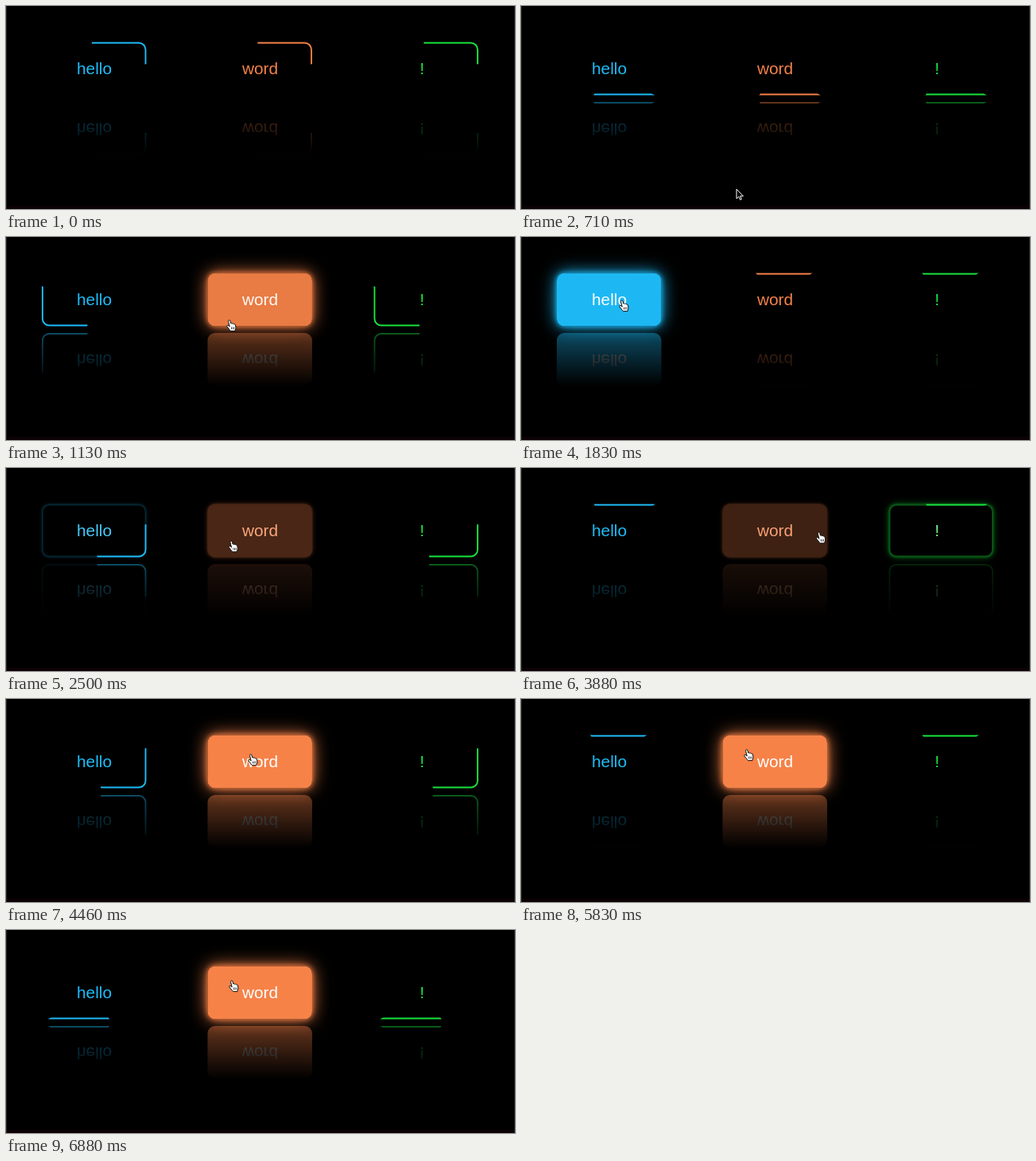
An HTML page with a canvas that plays this animation: 640x256 px, repeating every 6.93 s.

```html
<!DOCTYPE html>
<html lang="en">
<head>
<meta charset="utf-8">
<title>Neon buttons</title>
<style>
html, body { margin: 0; width: 100%; height: 100%; overflow: hidden; background: #000; }
canvas { display: block; }
</style>
</head>
<body>
<canvas id="stage" width="640" height="256"></canvas>
<script>
const W = 640, H = 256, LOOP = 6930, STEP = 125 / 3, FADE = 500;
const BOX = { w: 131.5, h: 67, y: 45.5, r: 9.5, line: 1.9 };
const MID = BOX.y + BOX.h / 2;
const MIRROR = 233.5; // y maps to MIRROR - y in the reflection

const ctx = document.getElementById('stage').getContext('2d');
const layer = document.createElement('canvas');
layer.width = W;
layer.height = H;
const mirror = layer.getContext('2d');

// hover: pairs of pointer enter and leave times
const buttons = [
  { label: 'hello', cx: 110.7, tx: 111, rgb: [30, 189, 249], hover: [[1430, 2240]] },
  { label: 'word', cx: 319.2, tx: 319.5, rgb: [246, 130, 72], hover: [[770, 1370], [2400, 2850], [3790, 1e5]] },
  { label: '!', cx: 528.2, tx: 523.2, rgb: [24, 228, 62], hover: [[3113, 3700]] }
];

// time, angle in degrees
const spin = [[0, -95], [1130, 104.4], [1830, 234.5], [3250, 486],
  [4460, 705.5], [5830, 954.7], [6880, 1140], [6930, 1149]];

// time, x, y
const pointer = [[560, 262, 258], [710, 268, 230], [790, 273, 112], [1130, 277, 104],
  [1330, 258, 100], [1430, 172, 92], [1830, 123, 79], [2130, 128, 82], [2260, 178, 88],
  [2400, 250, 90], [2850, 382, 95], [3110, 460, 98], [3250, 489, 98], [3500, 498, 96],
  [3700, 458, 90], [3790, 381, 82], [4460, 304, 69], [4900, 280, 63]];

const hand = new Path2D('M4.2 9L2.6 2.4Q2.4.9 3.7.8Q4.7.8 5 2L5.8 5Q7 4.4 7.6 5.3Q9 4.7 9.5 5.8' +
  'Q11 5.4 11.4 7L12 10Q12.1 12 11 13.6V14.6H5.6Q4 13 2.6 11L.8 8.8Q.4 7.4 1.8 7.3Q3 7.6 4.2 9Z');
const fingers = new Path2D('M6.5 9.5v3M8.2 9.5v3M9.9 9.5v3');
const arrow = new Path2D('M3 1V13L5.8 10.4L7.6 14.4L9.4 13.6L7.6 9.8H11.4Z');

const clamp = v => Math.min(1, Math.max(0, v));
const css = (rgb, a = 1) => `rgba(${rgb.map(Math.round).join()},${a})`;

function along(keys, t) {
  let i = 1;
  while (i < keys.length - 1 && keys[i][0] < t) i++;
  const a = keys[i - 1], b = keys[i];
  const k = clamp((t - a[0]) / (b[0] - a[0]));
  return a.slice(1).map((v, j) => v + (b[j + 1] - v) * k);
}

// cubic-bezier(.25, .1, .25, 1)
function ease(x) {
  x = clamp(x);
  let lo = 0, hi = 1;
  for (let i = 0; i < 20; i++) {
    const u = (lo + hi) / 2, v = 1 - u;
    if (0.75 * u * v + u * u * u < x) lo = u; else hi = u;
  }
  return 0.3 * lo * (1 - lo) ** 2 + 3 * lo * lo * (1 - lo) + lo ** 3;
}

const isHot = (b, t) => b.hover.some(([on, off]) => t >= on && t < off);
const heat = (b, t) => Math.min(1, b.hover.reduce((sum, [on, off]) =>
  sum + ease((t - on) / FADE) * (1 - ease((t - off) / FADE)), 0));

function frame(c, cx, inset = 0) {
  c.beginPath();
  c.roundRect(cx - BOX.w / 2 + inset, BOX.y + inset,
    BOX.w - 2 * inset, BOX.h - 2 * inset, BOX.r - inset);
}

function glow(b, p) {
  if (p < 0.01) return;
  ctx.save();
  ctx.shadowOffsetX = 2000;
  ctx.shadowColor = css(b.rgb, p);
  for (const blur of [7, 22]) {
    ctx.shadowBlur = blur * p;
    frame(ctx, b.cx - 2000);
    ctx.fillStyle = '#000';
    ctx.fill();
  }
  ctx.restore();
}

function face(c, b, p, hot, angle) {
  c.save();
  frame(c, b.cx);
  c.fillStyle = '#000';
  c.fill();
  c.fillStyle = css(b.rgb, p);
  c.fill();
  if (!hot) {
    c.save();
    c.clip();
    c.translate(b.cx, MID);
    c.rotate(angle * Math.PI / 180);
    c.fillStyle = css(b.rgb);
    c.fillRect(0, 0, 200, 200);
    c.restore();
    frame(c, b.cx, BOX.line);
    c.fillStyle = '#000';
    c.fill();
  }
  c.font = '20.8px "Liberation Sans", Arial, sans-serif';
  c.textAlign = 'center';
  c.fillStyle = css(b.rgb.map(v => v + (255 - v) * p));
  c.fillText(b.label, b.tx, 86);
  c.restore();
}

function reflect(t, angle) {
  const top = MIRROR - BOX.y - BOX.h;
  mirror.setTransform(1, 0, 0, 1, 0, 0);
  mirror.clearRect(0, 0, W, H);
  mirror.setTransform(1, 0, 0, -1, 0, MIRROR);
  for (const b of buttons) face(mirror, b, heat(b, t), isHot(b, t), angle);
  mirror.setTransform(1, 0, 0, 1, 0, 0);
  const fade = mirror.createLinearGradient(0, top, 0, top + BOX.h);
  fade.addColorStop(0, 'rgba(0,0,0,.4)');
  fade.addColorStop(1, 'rgba(0,0,0,0)');
  mirror.globalCompositeOperation = 'destination-in';
  mirror.fillStyle = fade;
  mirror.fillRect(0, 0, W, H);
  mirror.globalCompositeOperation = 'source-over';
  ctx.drawImage(layer, 0, 0);
}

function drawPointer(t) {
  if (t < pointer[0][0]) return;
  const [x, y] = along(pointer, t);
  const over = buttons.some(b => isHot(b, t));
  ctx.save();
  ctx.translate(x, y);
  ctx.lineJoin = 'round';
  ctx.lineWidth = 1;
  ctx.fillStyle = over ? '#fff' : '#000';
  ctx.strokeStyle = over ? '#111' : '#fff';
  ctx.fill(over ? hand : arrow);
  ctx.stroke(over ? hand : arrow);
  if (over) {
    ctx.lineWidth = 0.7;
    ctx.stroke(fingers);
  }
  ctx.restore();
}

function draw(t) {
  const [angle] = along(spin, t);
  ctx.fillStyle = '#000';
  ctx.fillRect(0, 0, W, H);
  ctx.fillStyle = '#0c0206';
  ctx.fillRect(0, 252, W, 4);
  ctx.fillStyle = '#2a2a2a';
  ctx.fillRect(0, 0, 1, H);
  ctx.fillRect(W - 1, 0, 1, H);
  for (const b of buttons) glow(b, heat(b, t));
  reflect(t, angle);
  for (const b of buttons) face(ctx, b, heat(b, t), isHot(b, t), angle);
  drawPointer(t);
}

// Hold each picture for one step, on times rounded to 10 ms
function hold(t) {
  const start = n => Math.round(n * STEP / 10) * 10;
  let n = Math.min(165, Math.ceil(t / STEP) + 1);
  while (n > 0 && start(n) > t) n--;
  return start(n);
}

const begin = performance.now();
function tick() {
  draw(hold((performance.now() - begin) % LOOP));
  requestAnimationFrame(tick);
}
tick();
</script>
</body>
</html>
```
